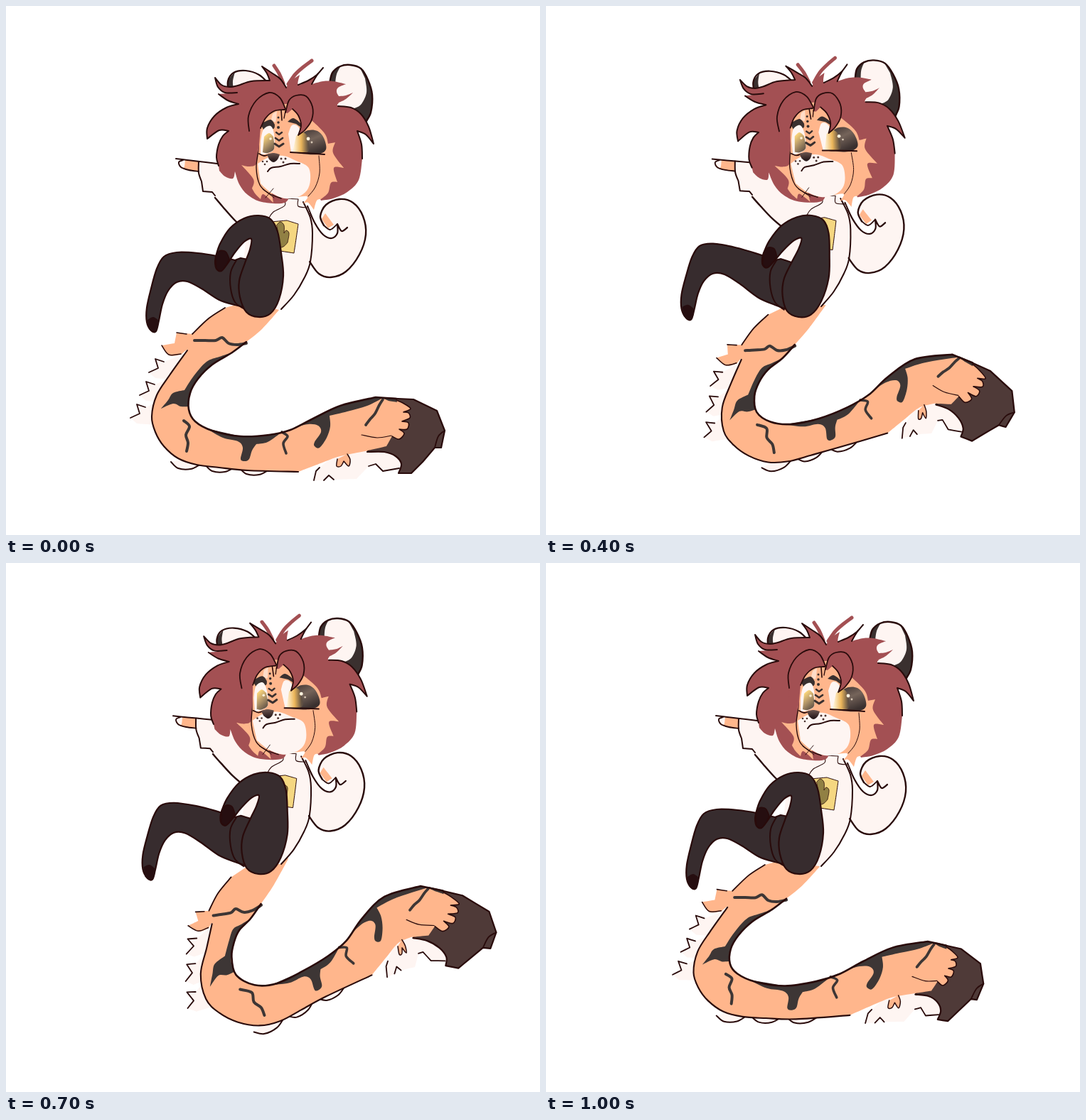
These frames come from a looping animation (751 px wide and 745 px high, 1.1 s). An HTML page with a canvas:

```html
<!DOCTYPE html>
<html lang="en">
<head>
<meta charset="utf-8">
<title>Tail swing</title>
<style>
html, body { margin: 0; width: 100%; height: 100%; overflow: hidden; background: #fff; }
canvas { display: block; }
</style>
</head>
<body>
<canvas id="stage" width="751" height="745"></canvas>
<script>
const ctx = document.getElementById('stage').getContext('2d');
const STEP = 100, STEPS = 11, BODY_PEAK = 5, TAIL_PEAK = 8;
const LINE = '#290b0b', FUR = '#fef5f2', PEACH = '#ffb68c', STRIPE = '#3d3635',
  TIP = '#4f3a38', HAIR = '#a35053', LEG = '#372c2e', DARK = '#3a302f', SHOE = '#260e10';

const points = s => s.trim().split(/\s+/).map(p => p.split(',').map(Number));
const join = (...parts) => parts.join(' | ');

// Lean of a body part around its joint.
const sway = (amount, [px, py], [dx, dy], shear, tilt, stretch = 0) => ([x, y]) => [
  x + amount * (dx + shear * (y - py) + stretch * (x - px)),
  y + amount * (dy + tilt * (x - px))
];

// Thin-plate warp that carries the rest pins onto the posed pins.
function warp(rest, posed, soft = 150) {
  const n = rest.length, size = n + 3;
  const kernel = (a, b) => {
    const q = (a[0] - b[0]) ** 2 + (a[1] - b[1]) ** 2;
    return q ? q * Math.log(q) / 2 : 0;
  };
  const rows = Array.from({ length: size }, () => new Array(size + 2).fill(0));
  rest.forEach((p, i) => {
    rest.forEach((q, j) => rows[i][j] = kernel(p, q));
    rows[i][i] = soft;
    [1, p[0], p[1]].forEach((v, k) => { rows[i][n + k] = v; rows[n + k][i] = v; });
    rows[i][size] = posed[i][0] - p[0];
    rows[i][size + 1] = posed[i][1] - p[1];
  });
  for (let c = 0; c < size; c++) {
    let best = c;
    for (let r = c + 1; r < size; r++) if (Math.abs(rows[r][c]) > Math.abs(rows[best][c])) best = r;
    [rows[c], rows[best]] = [rows[best], rows[c]];
    for (let r = 0; r < size; r++) {
      if (r === c) continue;
      const f = rows[r][c] / rows[c][c];
      if (f) for (let k = c; k < size + 2; k++) rows[r][k] -= f * rows[c][k];
    }
  }
  const w = rows.map((row, i) => [row[size] / row[i], row[size + 1] / row[i]]);
  return p => [0, 1].map(a => {
    let v = p[a] + w[n][a] + w[n + 1][a] * p[0] + w[n + 2][a] * p[1];
    for (let i = 0; i < n; i++) v += w[i][a] * kernel(p, rest[i]);
    return v;
  });
}

// Smooth curve through the points; "|" marks a corner.
function trace(bend, text) {
  let last = null;
  ctx.beginPath();
  for (const part of text.split('|')) {
    const run = points(part).map(bend);
    if (last) run.unshift(last);
    else ctx.moveTo(...run[0]);
    for (let i = 0; i < run.length - 1; i++) {
      const a = run[i - 1] || run[i], b = run[i], c = run[i + 1], d = run[i + 2] || c;
      ctx.bezierCurveTo(b[0] + (c[0] - a[0]) / 6, b[1] + (c[1] - a[1]) / 6,
        c[0] - (d[0] - b[0]) / 6, c[1] - (d[1] - b[1]) / 6, c[0], c[1]);
    }
    last = run[run.length - 1];
  }
}
function fill(bend, text, color, edge) {
  trace(bend, text);
  ctx.closePath();
  ctx.fillStyle = color;
  ctx.fill();
  if (edge) { ctx.strokeStyle = LINE; ctx.lineWidth = edge; ctx.stroke(); }
}
function line(bend, text, width = 2, color = LINE) {
  trace(bend, text);
  ctx.strokeStyle = color;
  ctx.lineWidth = width;
  ctx.stroke();
}
function dot(bend, x, y, r, color) {
  ctx.beginPath();
  ctx.arc(...bend([x, y]), r, 0, 7);
  ctx.fillStyle = color;
  ctx.fill();
}
function blend(bend, from, to, ...colors) {
  const g = ctx.createLinearGradient(...bend(from), ...bend(to));
  colors.forEach((c, i) => g.addColorStop(i / (colors.length - 1), c));
  return g;
}

// Spine of the tail, hanging low and swung up.
const low = points('346,427 301,473 250,525 232,572 252,606 338,630 393,627 452,606 515,590 590,605');
const high = points('358,430 326,495 311,541 311,600 361,624 447,589 494,560 534,507 580,481 668,505');

// Pins on both sides of every joint.
const sides = spine => spine.flatMap((p, i) => {
  const a = spine[Math.max(0, i - 1)], b = spine[Math.min(spine.length - 1, i + 1)];
  const dx = b[0] - a[0], dy = b[1] - a[1], k = 24 / Math.hypot(dx, dy);
  return [[p[0] + dy * k, p[1] - dx * k], [p[0] - dy * k, p[1] + dx * k]];
});

// Slow rise, quick fall; the middle arches up and the tip trails behind.
function tailBend(step) {
  const fall = Math.max(0, step - TAIL_PEAK);
  const t = fall ? 1 - fall / 2 : step / TAIL_PEAK;
  const arch = Math.sin(Math.PI * t), lift = 18 * arch + 11 * fall;
  const trail = fall ? -9 : 15 * arch;
  return warp(sides(low), sides(low.map(([x, y], i) => {
    const s = i / (low.length - 1), w = lift * Math.sin(Math.PI * s ** 3);
    return [x + (high[i][0] - x) * t + 0.8 * w,
      y + (high[i][1] - y) * t - w + trail * s ** 12];
  })));
}

function drawTail(b) {
  const root = '308,425 285,440 262,462', tuft = '240,460 | 237,475 | 219,478 | 229,492 246,491';
  const outer = '255,485 230,520 212,548 205,578 210,600 222,620 242,637 268,646 300,650 340,654 411,656';
  const inner = '520,551 | 470,563 430,582 400,597 370,604 330,606 290,598 266,585 257,568 259,545 270,525 290,505 318,488 338,473';
  const fluff = '543,606 | 553,610 560,602 553,596 | 564,596 566,587 557,585 | 568,580 566,573 559,572 | 569,567 558,559 549,555';

  // pale fringe
  for (let k = 0; k < 3; k++) {
    const x = 222 - 13 * k, y = 501 + 32 * k;
    const spikes = `${x},${y} | ${x - 12},${y - 4} | ${x - 8},${y + 9} | ${x - 21},${y + 15}`;
    fill(b, `${spikes} | ${x - 12},${y + 23} | ${x + 15},${y + 25} | ${x + 22},${y - 8}`, FUR);
    line(b, spikes, 1.8);
  }
  for (let k = 0; k < 3; k++) {
    const x = 232 + 48 * k, y = 642 + 4 * k;
    const bump = `${x},${y} ${x + 10},${y + 9} ${x + 28},${y + 10} ${x + 42},${y + 3}`;
    fill(b, `${bump} | ${x + 42},${y - 8}`, FUR);
    line(b, bump, 2);
  }
  const left = '441,650 | 436,655 | 433,668', mid = '447,668 | 454,661 | 461,667', right = '510,648 | 520,645 | 530,655 | 553,651';
  fill(b, join(left, mid, '493,666', right, '556,642 | 535,624 | 470,626'), FUR);
  [left, mid, right].forEach(s => line(b, s, 1.8));

  // tip
  fill(b, '530,552 | 573,554 | 606,570 | 617,598 | 612,622 | 603,622 | 586,642 | 570,658 | 552,658 | 556,645 548,634 532,628 508,628 | 530,600', TIP, 2.2);
  line(b, '617,598 608,606 603,622', 1.8);

  // body and markings
  fill(b, join(root, tuft, outer, '445,643 | 470,634 505,627 | 535,620', fluff, '545,552', inner, '360,455 384,428 | 345,415'), PEACH);
  line(b, '265,471 280,471 295,471 304,467 313,475 325,477 338,475', 4, STRIPE);
  fill(b, '318,488 | 300,494 282,501 264,521 251,541 | 235,545 228,555 218,567 | 235,560 246,564 257,564 | 257,550 268,527 295,502', STRIPE);
  line(b, '250,584 258,592 253,604 256,615 254,627', 4, STRIPE);
  fill(b, '282,595 | 305,608 326,613 333,622 330,638 336,641 342,638 346,626 352,617 | 368,614 388,600 | 360,605 330,606', STRIPE);
  line(b, '388,600 396,606 390,616 394,630', 3.6, STRIPE);
  fill(b, '405,594 | 425,589 439,591 443,600 434,614 434,620 441,622 451,608 456,592 455,577 | 480,571 508,563 530,552 | 520,551 | 470,563 430,582', STRIPE);
  line(b, '530,554 525,562 519,574 512,582 506,590', 3.8, STRIPE);
  fill(b, '529,552 | 549,552 | 550,558 | 538,556', STRIPE);

  // outlines
  line(b, root, 1.8);
  line(b, '240,460 | 254,462', 1.6);
  line(b, '219,478 | 229,491 246,490', 1.5);
  line(b, outer, 2.1);
  line(b, join('549,553', inner), 2.6);
  line(b, fluff, 1.6);
  line(b, '500,604 522,608 542,605', 1.2);
  const knot = '466,638 465,648 471,648 475,641 | 482,648 484,639 480,631';
  fill(b, knot, PEACH);
  line(b, knot, 1.5);
}

function drawTorso(b) {
  // pointing arm
  const cuff = '271,219 271,235 275,247 | 277,261 | 290,262 | 294,267', under = '294,270 305,283 322,302 340,318';
  fill(b, '243,218 255,217 272,219 | 274,234 | 255,231 247,228 243,222', PEACH);
  fill(b, '242,217 252,217 | 250,228 243,222', FUR);
  fill(b, join(cuff, under, '395,310 | 392,275 | 340,240 | 297,222'), FUR);
  line(b, '239,215 255,217 272,219 297,222', 2);
  line(b, '249,217 243,220 246,227 257,231 271,233', 1.9);
  line(b, cuff, 2);
  line(b, under, 2.4);
  // curled arm
  const hook = '424,282 434,305 446,322 458,327 466,320 466,307';
  const curl = '447,309 442,296 450,280 469,272 488,277 502,296 506,322 497,350 478,374 457,382 440,377 427,360';
  fill(b, join(hook, curl), FUR);
  fill(b, '444,300 449,292 | 461,308 | 453,313', PEACH);
  line(b, curl, 2.4);
  line(b, join(hook, '472,317 480,312'), 2.2);
  line(b, '447,309 456,315 466,307', 1.8);
  // shirt
  fill(b, '372,290 392,272 412,272 424,284 430,310 429,345 420,380 405,405 387,427 | 345,425 | 334,360 | 338,325 | 365,300', FUR);
  line(b, '369,300 376,290 392,281 391,271 | 411,272 | 411,282 424,284', 1.1);
  line(b, '418,276 428,298 431,320 428,360 420,382 405,407 387,427', 2);
  fill(b, '372,304 395,302 | 411,307 | 408,328 405,348 | 366,342', '#f5d781', 1);
  fill(b, '381,308 386,304 391,309 391,320 | 394,316 398,320 396,333 | 390,339 381,341 | 377,332 383,325', '#918044', .8);
}

function drawBackLeg(b) {
  fill(b, '322,358 296,352 270,348 240,347 222,353 212,370 204,398 198,425 198,445 204,457 211,458 215,443 220,420 228,401 240,389 255,388 275,398 300,414 322,421 | 342,426 | 345,358 | 330,355', LEG, 2.2);
  fill(b, '199,442 207,438 215,443 | 213,454 207,459 201,455', SHOE);
  line(b, '324,358 316,375 316,398 322,417 334,426', 2);
}

function drawFrontLeg(b) {
  fill(b, '295,353 301,335 315,313 335,299 355,295 372,300 382,318 387,348 390,380 384,413 372,433 355,438 338,431 329,410 328,387 336,362 343,343 345,328 335,332 322,347 312,362 303,373 296,370 294,361 295,353', LEG, 2.2);
  fill(b, '295,353 300,345 309,346 314,356 | 310,364 303,373 296,370', SHOE, 1.4);
}

function drawEars(b) {
  const left = '313,124 312,106 320,94 337,91 356,97 370,110', right = '455,109 459,94 470,85 484,83 499,88 509,104 515,125 513,150 506,163';
  fill(b, join(left, '340,130'), FUR);
  fill(b, '313,124 312,106 322,93 | 319,106 320,118', DARK);
  line(b, left, 2.2);
  fill(b, join(right, '468,140 462,118'), FUR);
  fill(b, '498,87 509,104 515,125 513,150 506,167 | 487,145 | 499,139 507,122 505,102', DARK);
  fill(b, '455,109 459,94 471,84 | 465,96 463,109', DARK);
  line(b, right, 2.4);
}

function drawHair(b) {
  const side = '299,225 296,213 299,195 305,183 313,176 | 300,175 283,187 | 283,172 293,155 310,143 327,138 | 312,133 299,124';
  const crown = '325,122 308,122 298,114 294,101 | 303,111 314,114 326,112 345,106 371,105 | 367,95 360,85 | 375,95 386,103 394,115';
  const horn = '411,111 425,105 437,97 446,87 | 437,98 430,110';
  const flick = '467,141 485,143 499,152 510,170 517,194 | 506,181 494,176 | 500,195 501,215';
  line(b, '390,109 384,95 377,84', 5, HAIR);
  line(b, '397,110 407,96 418,86 430,77', 5, HAIR);
  fill(b, join(side, crown, '400,106 413,97', horn, '446,106 460,106 478,110',
    '467,115 465,121 468,127 | 478,126 488,122 | 478,131 468,136', flick,
    '496,245 480,262 460,271 443,274 | 432,250 | 400,262 | 392,277 360,276 340,266 328,251 322,233',
    '319,243 308,240 300,232'), HAIR);
  [side, crown, horn, flick].forEach(s => line(b, s, 2));
}

function drawFace(b) {
  fill(b, '356,165 370,148 395,138 420,153 447,178 453,194 | 463,192 | 460,207 475,228 | 461,228 466,248 | 457,249 453,263 443,272 | 437,274 433,287 | 425,277 418,278 | 423,268 393,271 374,264 | 376,277 | 362,265 358,272 | 351,265 346,257 | 348,244 331,224 | 342,226 352,222 354,200', PEACH);
  fill(b, '354,222 370,213 390,211 408,218 425,227 428,245 423,260 410,269 392,271 373,263 358,250', FUR);
  // far eye
  fill(b, '413,182 425,175 438,176 447,186 450,202 438,209 415,208 402,205', blend(b, [415, 172], [430, 209], DARK, '#75645a', DARK));
  fill(b, '397,180 402,168 410,169 415,180 414,199 401,206', FUR);
  fill(b, '408,183 416,178 424,184 425,205 403,206', blend(b, [405, 190], [425, 190], '#fff0d2', '#edb75b', '#5e4f43'));
  line(b, '400,206 420,207 448,209', 2);
  dot(b, 425, 187, 2.4, '#fff2de');
  dot(b, 430, 192, 1.4, '#d9c9b7');
  fill(b, '396,163 404,158 414,165 418,173 | 408,166', DARK);
  // near eye
  fill(b, '358,166 372,160 378,167 | 376,173 362,174', DARK);
  fill(b, '358,190 362,174 372,169 377,180 377,201 368,208 | 358,210', FUR);
  fill(b, '363,184 370,179 376,184 | 377,201 368,207 361,206', blend(b, [361, 185], [377, 203], '#ffda7c', '#b29569', '#5f5145'));
  line(b, '356,208 363,211 370,209', 1.8);
  dot(b, 372, 187, 1.8, '#fff3dc');
  fill(b, '375,152 381,148 | 379,163 373,160', '#ffdcc8');
  // brow spots and chevrons
  for (let k = 0; k < 3; k++) {
    const x = 380 - k, y = 178 + 8 * k;
    dot(b, 383, 157 + 7 * k, 1.5 + k / 4, DARK);
    line(b, `${x},${y} | ${x + 4 + k},${y + 3 + k / 2} | ${x + 8 + 2 * k},${y}`, 2.4 + k / 3, DARK);
  }
  fill(b, '367,209 376,207 385,209 | 382,216 376,220 370,216', blend(b, [376, 207], [376, 218], '#6d5650', '#291b1c'));
  for (let k = 0; k < 3; k++) {
    dot(b, 361 + 3 * k, 219 + 4 * (k % 2), 1.3, '#49322f');
    dot(b, 387 + 3 * k, 215 + 5 * (k % 2), 1.5, '#49322f');
  }
  line(b, '368,233 373,228 386,226 400,222 413,222', 2);
  // fine contours
  line(b, '354,166 355,200 352,228 357,252 370,264 387,271', 1.4);
  line(b, '440,211 441,235 435,255 425,268', 1);
  line(b, '361,258 377,270', 1);
  line(b, '376,257 365,270', 1);
}

function drawBangs(b) {
  const left = '342,176 341,155 352,133 370,122 385,129 393,145', part = '392,146 377,148 365,158 358,172';
  const right = '393,150 398,133 408,126 422,127 431,142 430,160 421,174 411,182 | 415,168 411,154 403,145';
  fill(b, join(left, part, '355,208 | 351,185 | 340,190'), HAIR);
  fill(b, join(right, '396,151'), HAIR);
  [left, right, part].forEach(s => line(b, s, 1.8));
  line(b, '387,147 388,161', 1.6);
  line(b, '393,148 391,158', 1.3);
}

function draw(step) {
  ctx.fillStyle = '#fff';
  ctx.fillRect(0, 0, 751, 745);
  ctx.lineCap = ctx.lineJoin = 'round';
  const lean = (BODY_PEAK - Math.abs(BODY_PEAK - step)) / 4;
  const head = sway(lean, [392, 271], [-5, -2], .095, -.05);
  drawTail(tailBend(step));
  drawEars(head);
  drawTorso(sway(lean, [388, 427], [0, -4], .025, -.03));
  drawBackLeg(sway(lean, [322, 410], [0, 0], 0, .15, .06));
  drawFrontLeg(sway(lean, [355, 438], [0, 0], -.13, .09));
  drawHair(head);
  drawFace(head);
  drawBangs(head);
}

const begin = performance.now();
let shown = -1;
function tick() {
  const step = Math.floor((performance.now() - begin) / STEP) % STEPS;
  if (step !== shown) draw(shown = step);
  requestAnimationFrame(tick);
}
tick();
</script>
</body>
</html>
```
